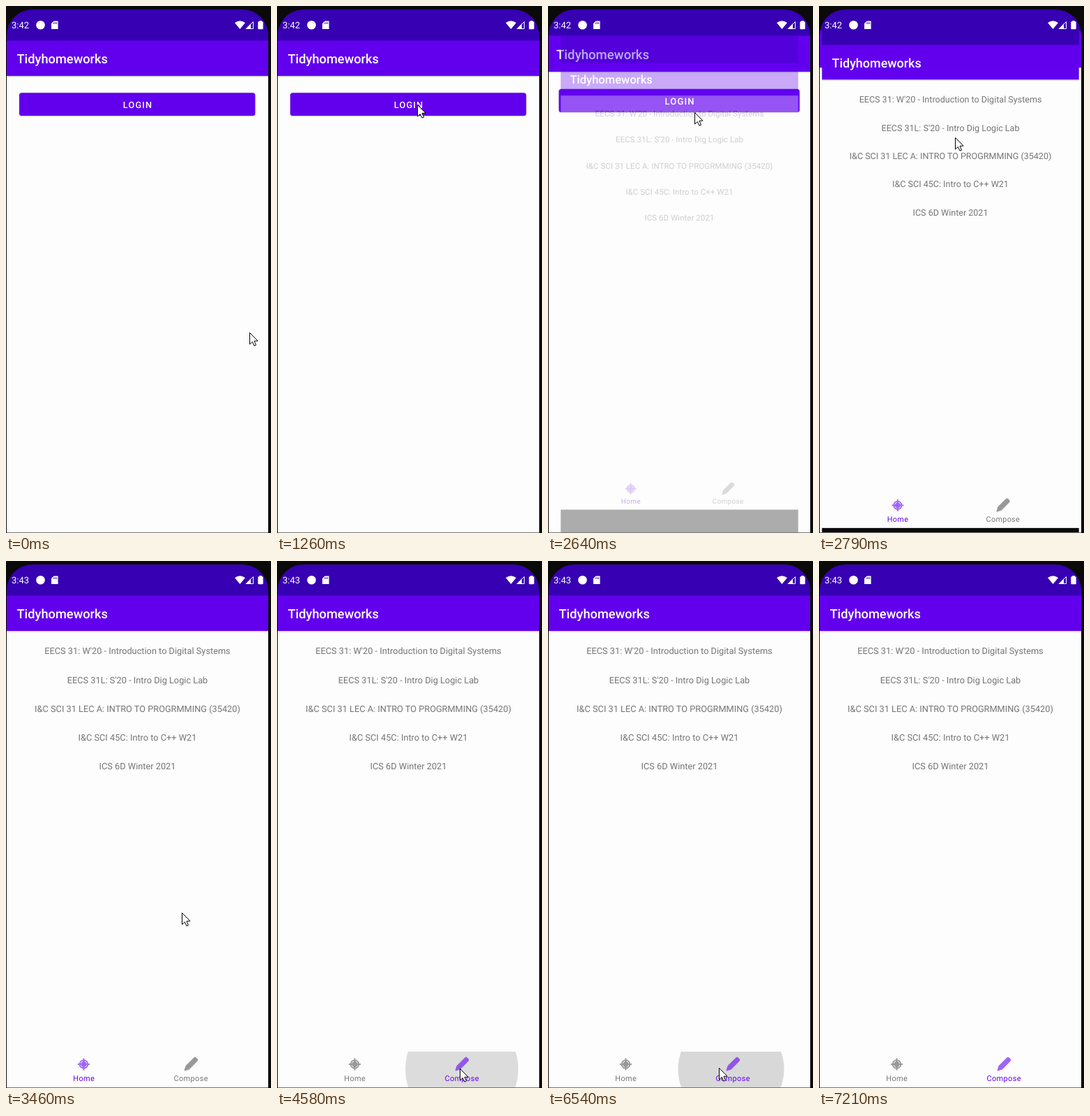
Recreate the animation shown at these times as an HTML page with a canvas. Size 380 px wide and 754 px high, loop 8400 ms.

```html
<!DOCTYPE html>
<html lang="en">
<head>
<meta charset="utf-8">
<title>Course list</title>
<style>
html, body { margin: 0; width: 100%; height: 100%; overflow: hidden; background: #0a0a0a; }
canvas { display: block; width: 380px; height: 754px; }
</style>
</head>
<body>
<canvas id="stage"></canvas>
<script>
const W = 380, H = 754, LOOP = 8400;
const PURPLE = '#6200ee', DARK = '#3700b3', PAPER = '#fdfdfd', GREY = '#757575', BLACK = '#0a0a0a';
const CENTER = { x: 188.5, y: 401 };
const NAV_X = [111.5, 265];
const dpr = window.devicePixelRatio || 1;
const start = performance.now();

function prepare(canvas) {
  canvas.width = W * dpr;
  canvas.height = H * dpr;
  const c = canvas.getContext('2d');
  c.scale(dpr, dpr);
  return c;
}
const ctx = prepare(document.getElementById('stage'));
const layer = prepare(document.createElement('canvas'));

const courses = [
  "EECS 31: W'20 - Introduction to Digital Systems",
  "EECS 31L: S'20 - Intro Dig Logic Lab",
  'I&C SCI 31 LEC A: INTRO TO PROGRMMING (35420)',
  'I&C SCI 45C: Intro to C++ W21',
  'ICS 6D Winter 2021'
];

// Each span: pointer key points two steps apart; "wait" steps pass before it moves
const spans = [
  { from: 150, to: 1810, wait: -1,
    keys: [[349, 467], [366, 395], [368, 285], [305, 185], [222, 147], [198, 138], [266, 132], [243, 134]] },
  { from: 2210, to: 4150, wait: 1,
    keys: [[243, 134], [210, 152], [187, 240], [205, 385], [252, 503], [346, 605], [335, 700], [262, 726]] },
  { from: 4430, to: 5110, wait: 1, item: 1, radius: 58, keys: [[262, 726], [190, 717], [109, 724]] },
  { from: 5380, to: 5990, wait: 1, item: 0, radius: 58, keys: [[109, 724], [185, 656], [245, 725]] },
  { from: 6540, to: 7210, wait: 1, item: 1, radius: 76, keys: [[245, 725], [240, 740], [235, 780]] }
];

// Steps alternate between a long and a short hold
function stepAt(span, t) {
  const d = t - span.from;
  return 2 * Math.floor(d / 276) + (d % 276 >= 146 ? 1 : 0);
}

function spline(keys, u) {
  const last = keys.length - 1;
  u = Math.max(0, Math.min(last, u));
  const i = Math.min(last - 1, Math.floor(u)), f = u - i;
  const key = j => keys[Math.max(0, Math.min(last, j))];
  return [0, 1].map(k => {
    const [a, b, c, d] = [-1, 0, 1, 2].map(j => key(i + j)[k]);
    return b + f / 2 * (c - a + f * (2 * a - 5 * b + 4 * c - d + f * (3 * (b - c) + d - a)));
  });
}

function stateAt(t) {
  const index = spans.findLastIndex(s => t >= s.from);
  if (index < 0) return { index, step: 0, pos: spans[0].keys[0] };
  const span = spans[index], done = t >= span.to;
  const step = stepAt(span, Math.min(t, span.to));
  const pos = done ? span.keys.at(-1) : spline(span.keys, (step - span.wait) / 2);
  return { index, step, pos, done };
}

function text(c, str, x, y, size, color, { weight = 400, align = 'center', spacing = 0 } = {}) {
  c.font = `${weight} ${size}px Roboto, sans-serif`;
  c.textRendering = 'geometricPrecision';
  c.fillStyle = color;
  c.textAlign = align;
  c.letterSpacing = spacing + 'px';
  c.fillText(str, x + (align === 'center' ? spacing / 2 : 0), y);
}

function rect(c, color, x, y, w, h) {
  c.fillStyle = color;
  c.fillRect(x, y, w, h);
}

function disc(c, color, x, y, r) {
  c.fillStyle = color;
  c.beginPath();
  c.arc(x, y, r, 0, 7);
  c.fill();
}

function poly(c, points) {
  c.beginPath();
  points.forEach(p => c.lineTo(...p));
  c.closePath();
}

function frame(c) {
  rect(c, PAPER, 1, 100, 375, 653);
  rect(c, BLACK, 1, 753, 375, 60);
  const g = c.createLinearGradient(0, 100, 0, 102.5);
  g.addColorStop(0, 'rgba(0,0,0,.22)');
  g.addColorStop(1, 'rgba(0,0,0,0)');
  rect(c, g, 1, 100, 375, 3);
  rect(c, DARK, 1, 0, 375, 50);
  rect(c, PURPLE, 1, 49.5, 375, 50.5);
  text(c, 'Tidyhomeworks', 15.5, 82, 18.25, '#fff', { weight: 500, align: 'left' });
}

function loginScreen(c, press) {
  frame(c);
  c.save();
  c.shadowColor = 'rgba(0,0,0,.3)';
  c.shadowBlur = (press ? 7 : 1.5) * dpr;
  c.shadowOffsetY = (press ? 1 : 0.5) * dpr;
  c.fillStyle = PURPLE;
  c.beginPath();
  c.roundRect(19, 124.2, 338.3, 32.8, 3.5);
  c.fill();
  c.restore();
  if (press) {
    c.save();
    c.clip();
    disc(c, `rgba(255,255,255,${press.alpha})`, 243, 138, press.radius);
    c.restore();
  }
  text(c, 'LOGIN', 188.5, 145.7, 12.77, '#fff', { weight: 500, spacing: 1.14 });
}

function crosshair(c, x, y) {
  c.lineWidth = 1.8;
  c.beginPath();
  c.arc(x, y, 5.8, 0, 7);
  c.stroke();
  c.beginPath();
  c.arc(x, y, 3.9, 0, 7);
  c.fill();
  for (let i = 0; i < 4; i++) {
    c.save();
    c.translate(x, y);
    c.rotate(i * Math.PI / 2);
    c.fillRect(-1, -8.6, 2, 1.9);
    c.fillRect(-1.2, -5, 2.4, 1.2);
    c.restore();
  }
}

function pencil(c, x, y) {
  c.save();
  c.translate(x, y);
  c.rotate(Math.PI / 4);
  c.beginPath();
  c.roundRect(-3.7, -12.2, 7.4, 19, [3, 3, 0, 0]);
  c.moveTo(-3.7, 6.8);
  c.lineTo(3.7, 6.8);
  c.lineTo(0.6, 12.8);
  c.lineTo(-0.6, 12.8);
  c.fill();
  c.restore();
}

function navItem(c, name, x, active, icon) {
  c.fillStyle = c.strokeStyle = active ? 'rgba(98,0,238,.6)' : 'rgba(0,0,0,.4)';
  icon(c, x, 720);
  text(c, name, x, 744, 10.94, active ? PURPLE : GREY, { spacing: 0.37 });
}

function listScreen(c, selected, ripple) {
  frame(c);
  courses.forEach((name, i) => text(c, name, 188.5, 133.4 + 41.15 * i, 12.77, GREY));
  if (ripple) {
    c.save();
    c.beginPath();
    c.rect(1, 702, 375, 51);
    c.clip();
    disc(c, `rgba(0,0,0,${ripple.alpha})`, ripple.x, 727, ripple.radius);
    c.restore();
  }
  navItem(c, 'Home', NAV_X[0], selected === 0, crosshair);
  navItem(c, 'Compose', NAV_X[1], selected === 1, pencil);
}

function zoom(c, s, draw) {
  c.save();
  c.translate(CENTER.x, CENTER.y);
  c.scale(s, s);
  c.translate(-CENTER.x, -CENTER.y);
  draw(c);
  c.restore();
}

// The old window grows a little while the new one grows and fades in above it
function openList(n) {
  zoom(ctx, 1 + 0.02 * (n + 1), c => loginScreen(c));
  layer.clearRect(0, 0, W, H);
  zoom(layer, 1 - 0.092 * 0.19 ** n, c => listScreen(c, 0));
  ctx.globalAlpha = Math.min(1, 0.33 + n);
  ctx.drawImage(layer.canvas, 0, 0, W, H);
  ctx.globalAlpha = 1;
}

function tapNav({ item, radius }, step) {
  const r = step ? 81 : radius;
  const ripple = {
    x: NAV_X[item] - (step ? 0 : 2.5),
    radius: r,
    alpha: 0.146 * Math.max(0, 1 - (step / 3) ** 2)
  };
  listScreen(ctx, r > 70 ? item : 1 - item, ripple);
}

function screens({ index, step, done }) {
  if (index < 1) loginScreen(ctx);
  else if (index > 1) tapNav(spans[index], step);
  else if (step < 3) loginScreen(ctx, { radius: 95 + 165 * step, alpha: 0.13 });
  else if (step < 7 && !done) openList(step - 3);
  else listScreen(ctx, 0);
}

function statusIcons(clock) {
  const c = ctx;
  text(c, clock, 8, 32, 13, '#fff', { align: 'left' });
  disc(c, '#fff', 49.5, 27.3, 6.3);
  poly(c, [[68.5, 21.5], [74.6, 21.5], [74.6, 33], [65, 33], [65, 25]]);
  c.fill();
  for (let i = 0; i < 3; i++) rect(c, DARK, 68.2 + i * 2, 23.3, 1, 2.4);
  c.fillStyle = '#fff';
  c.beginPath();
  c.moveTo(335.5, 33);
  c.lineTo(328, 24);
  c.quadraticCurveTo(335.5, 18.4, 343, 24);
  c.fill();
  poly(c, [[343.3, 33], [351, 25.3], [351, 33]]);
  c.fill();
  c.strokeStyle = '#fff';
  c.lineWidth = 1;
  poly(c, [[344.5, 32.5], [354.5, 22.5], [354.5, 32.5]]);
  c.stroke();
  c.beginPath();
  c.roundRect(361.3, 22.3, 7.4, 10.9, 1);
  c.rect(363.3, 21, 3.4, 2);
  c.fill();
}

function pointer([x, y]) {
  ctx.save();
  ctx.translate(Math.round(x) + 0.5, Math.round(y) + 0.5);
  poly(ctx, [[0, 0], [0, 16.5], [3.8, 13], [6.5, 18.7], [9, 17.6], [6.5, 11.9], [11.5, 11.6]]);
  ctx.fillStyle = '#fff';
  ctx.strokeStyle = '#000';
  ctx.lineWidth = 1;
  ctx.fill();
  ctx.stroke();
  ctx.restore();
}

function draw() {
  const t = (performance.now() - start) % LOOP;
  const state = stateAt(t);
  rect(ctx, BLACK, 0, 0, W, H);
  ctx.save();
  ctx.beginPath();
  ctx.roundRect(1, 5, 375, 748, [37, 37, 0, 0]);
  ctx.clip();
  screens(state);
  ctx.restore();
  rect(ctx, '#777', 1, 753, 375, 1);
  statusIcons(t < 3310 ? '3:42' : '3:43');
  pointer(state.pos);
  requestAnimationFrame(draw);
}
draw();
</script>
</body>
</html>
```
